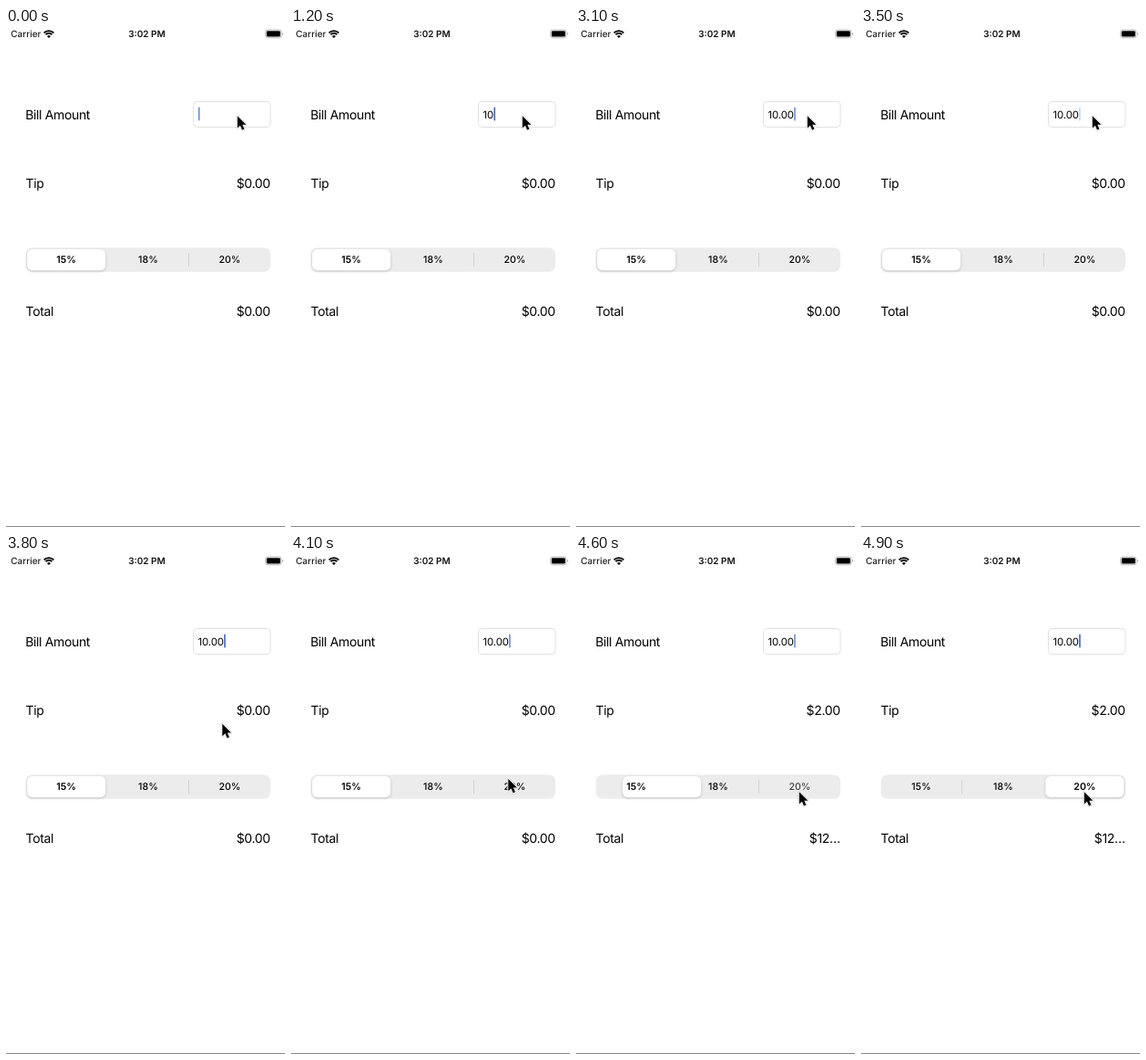
An HTML page that plays this animation: 306 by 546 pixels, repeating every 5000 ms.

```html
<!DOCTYPE html>
<html lang="en">
<head>
<meta charset="utf-8">
<title>Tip calculator</title>
<style>
  html, body { margin: 0; width: 100%; height: 100%; overflow: hidden; background: #fff; }
  svg {
    display: block; width: 100%; height: 100%;
    font-family: Inter, "Open Sans", sans-serif; text-rendering: geometricPrecision;
  }
  .status { font-size: 10px; }
  .label { font-size: 14px; letter-spacing: -.025em; }
  .value { text-anchor: end; }
  #amount { font-size: 11.4px; letter-spacing: -.011em; }
  .segment { font-size: 10.6px; font-weight: 500; text-anchor: middle; }
  .selected { font-weight: 600; }
  #thumb { filter: drop-shadow(0 1px 1.5px rgba(0, 0, 0, .2)); }
  #pointer { filter: drop-shadow(0 .7px .7px rgba(0, 0, 0, .45)); }
</style>
</head>
<body>
<svg viewBox="0 0 306 546">
  <!-- status bar -->
  <text class="status" x="5.2" y="10" font-weight="450" fill="#222">Carrier</text>
  <g fill="none" stroke="#000" stroke-width="1.8">
    <path d="M41.6 5.3a7.6 7.6 0 0 1 10.8 0M43.5 7.2a4.9 4.9 0 0 1 7 0"/>
    <path d="M47 10.9l-2-2a2.9 2.9 0 0 1 4 0z" fill="#000" stroke="none"/>
  </g>
  <text class="status" x="154.5" y="10" text-anchor="middle" font-weight="600" fill="#111">3:02 PM</text>
  <rect x="284.6" y="2" width="17.4" height="8.8" rx="2.5" fill="none" stroke="#a6a6a6" stroke-width=".8"/>
  <rect x="285.8" y="3.2" width="15" height="6.4" rx="1.4"/>
  <path d="M303 5v2.8q1-.4 1-1.4t-1-1.4" fill="#a6a6a6"/>

  <!-- form -->
  <g class="label">
    <text x="21.2" y="100">Bill Amount</text>
    <text x="21.6" y="175">Tip</text>
    <text x="21.6" y="315">Total</text>
    <text id="tip" class="value" x="289.7" y="175"></text>
    <text id="total" class="value" x="289.7" y="315"></text>
  </g>
  <rect x="205.5" y="80.5" width="84.5" height="28" rx="4" fill="#fff" stroke="#dedede" stroke-width=".9"/>
  <text id="amount" x="210.6" y="99"></text>
  <rect id="caret" y="86.6" width="1.6" height="15" rx=".8" fill="#3f61d0"/>

  <!-- tip rates -->
  <rect x="21.8" y="240.4" width="268.2" height="26.4" rx="7" fill="#ececed"/>
  <g fill="#cfcfd1">
    <rect id="leftDivider" x="110.2" y="246" width=".9" height="15.5"/>
    <rect id="rightDivider" x="200.1" y="246" width=".9" height="15.5"/>
  </g>
  <rect id="thumb" x="23.2" y="242" width="86" height="23.2" rx="5.6" fill="#fff"/>
  <text id="low" class="segment" x="66" y="257.4">15%</text>
  <text class="segment" x="155.9" y="257.4">18%</text>
  <text id="high" class="segment" x="245.4" y="257.4">20%</text>

  <rect y="545" width="306" height="1" fill="#8a8a8a"/>
  <path id="pointer" d="M0 0V13.4L3.1 10.5L5.2 15.4L7.6 14.4L5.5 9.6H9.6Z"
        stroke="#fff" stroke-width="2" stroke-linejoin="round" paint-order="stroke"/>
</svg>
<script>
const LOOP = 5000, FRAME = 100;
const BILL = "10.00", TIP_RATE = .2;
const THUMB_TRAVEL = 179.2;
const PRESS = 4500, RELEASE = 4600;

// When each key shows, and how many characters stand by then.
const keys = [{ time: 1200, count: 2 }, { time: 2100, count: 3 },
              { time: 2400, count: 4 }, { time: 2600, count: 5 }];

const $ = id => document.getElementById(id);
const clamp = value => Math.min(1, Math.max(0, value));
const progress = (time, start, duration) => clamp((time - start) / duration);
const smooth = u => u * u * (3 - 2 * u);
const dollars = amount => "$" + amount.toFixed(2);
const truncate = text => text.length > 5 ? text.slice(0, 3) + "…" : text;

// One blink per second, solid for the first half.
const blink = since => clamp(.75 + .8 * Math.cos(2 * Math.PI * (since - 250) / 1000));

function caretOpacity(time, key) {
  if (!key) return time < FRAME ? .75 : 0;
  const firstStroke = 800;
  return blink(time - (key === keys[0] ? firstStroke : key.time));
}

function pointerAt(time) {
  const s = Math.sin(progress(time, 3500, 820) * Math.PI / 2);
  const sag = 14.5 * Math.sin(Math.PI * s * s);
  return [253.8 - 9 * s - sag, 96.2 + 163 * s];
}

function render(time) {
  const key = keys.filter(k => k.time <= time).pop();
  const amount = $("amount"), caret = $("caret");
  amount.textContent = BILL.slice(0, key ? key.count : 0);
  caret.setAttribute("x", 210.9 + (key ? amount.getComputedTextLength() : 0));
  caret.style.opacity = caretOpacity(time, key);

  $("pointer").setAttribute("transform", `translate(${pointerAt(time)})`);

  const slide = smooth(progress(time, PRESS, 400));
  $("thumb").setAttribute("transform", `translate(${THUMB_TRAVEL * slide})`);
  $("leftDivider").style.opacity = slide;
  $("rightDivider").style.opacity = 1 - slide;
  $("low").classList.toggle("selected", slide < .5);
  $("high").classList.toggle("selected", slide >= .5);
  $("high").style.opacity = time < PRESS ? 1 : .68 + .32 * slide;

  const bill = time < RELEASE ? 0 : Number(BILL);
  $("tip").textContent = dollars(bill * TIP_RATE);
  $("total").textContent = truncate(dollars(bill * (1 + TIP_RATE)));
}

const start = performance.now();
function tick() {
  const elapsed = (performance.now() - start) % LOOP;
  render(Math.floor(elapsed / FRAME) * FRAME);
  requestAnimationFrame(tick);
}
tick();
</script>
</body>
</html>
```
